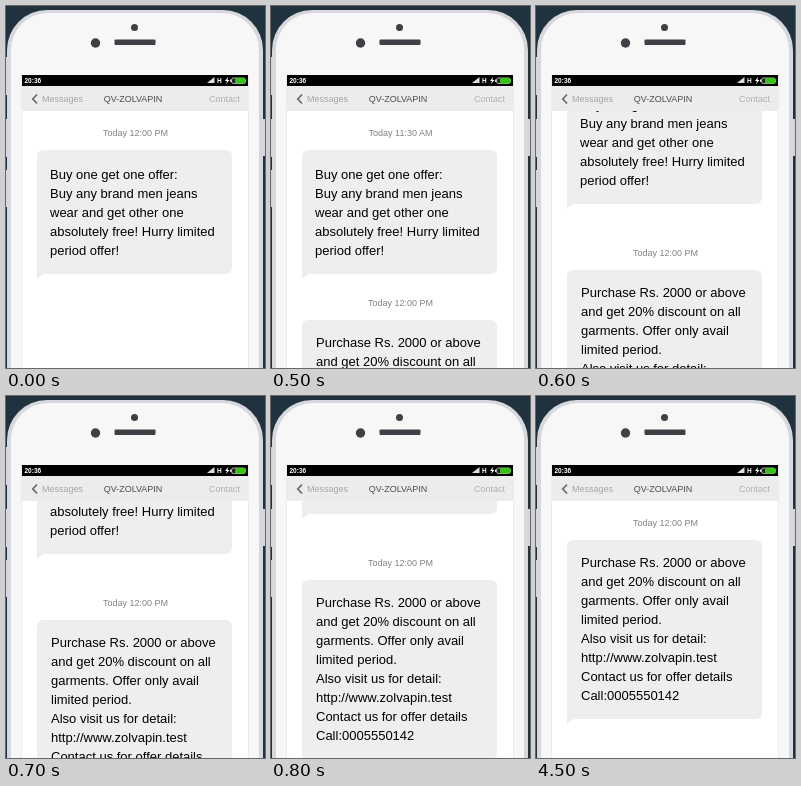
Animation of 259 by 362 pixels, one loop 6900 ms. Source, as an HTML page:

```html
<!DOCTYPE html>
<html lang="en">
<head>
<meta charset="utf-8">
<title>Message thread</title>
<style>
  html, body { margin: 0; width: 100%; height: 100%; overflow: hidden; background: #20323d; }
  svg { display: block; width: 259px; height: 362px; }
  text { font-family: "Liberation Sans", Arial, sans-serif; white-space: pre; }
  .small { font-size: 9px; }
  .body { font-size: 13px; fill: #000; }
  .stamp { font-size: 9px; fill: #808080; text-anchor: middle; }
  .bubble { fill: #eee; }
</style>
</head>
<body>
<svg viewBox="0 0 259 362">
  <defs>
    <clipPath id="chat"><rect x="16" y="105" width="226" height="257"/></clipPath>
  </defs>

  <rect width="259" height="362" fill="#20323d"/>

  <!-- side buttons -->
  <g fill="#d3d5da">
    <rect x="0" y="51" width="3" height="38"/>
    <rect x="0" y="113" width="3" height="38"/>
    <rect x="0" y="164" width="3" height="37"/>
    <rect x="255" y="113" width="4" height="37"/>
  </g>

  <!-- case -->
  <rect x="1" y="4" width="256" height="420" rx="40" fill="#d6d8dd"/>
  <rect x="5" y="7" width="248" height="420" rx="37" fill="#f7f7f7"/>
  <g fill="#3f4046">
    <circle cx="128.500" cy="21.500" r="3.500"/>
    <circle cx="89.500" cy="37" r="4.700"/>
    <rect x="108.500" y="33.500" width="41" height="5.500" rx="1"/>
  </g>

  <!-- screen -->
  <rect x="15" y="69" width="228" height="293" fill="#ebebeb"/>
  <rect x="16" y="105" width="226" height="257" fill="#fff"/>
  <g id="thread" clip-path="url(#chat)"></g>

  <!-- status bar -->
  <rect x="16" y="69" width="226" height="11" fill="#000"/>
  <g fill="#fff" font-size="6.500" font-weight="bold">
    <text x="18.500" y="77">20:36</text>
    <path d="M201 77 L208.500 77 L208.500 71 Z" fill="#ddd"/>
    <text x="211" y="77">H</text>
    <path d="M222 71 L219 75 H221 L220 78 L223.500 74 H221.500 Z"/>
  </g>
  <rect x="225.500" y="72" width="14" height="5.500" rx="2" fill="#222" stroke="#cfd8cc" stroke-width=".8"/>
  <rect x="229" y="72" width="10.500" height="5.500" rx="1.500" fill="#35c414"/>
  <rect x="224" y="73.500" width="1.500" height="2.500" fill="#cfd8cc"/>

  <!-- title bar -->
  <rect x="15" y="80" width="228" height="25" fill="#ececec"/>
  <path d="M31 88.500 L26.800 93 L31 97.500" fill="none" stroke="#6c6c6c" stroke-width="1.800"/>
  <g class="small">
    <text x="36" y="96" fill="#a6a6a6">Messages</text>
    <text x="127" y="96" fill="#4c4c4c" text-anchor="middle">QV-ZOLVAPIN</text>
    <text x="203" y="96" fill="#b0b0b0">Contact</text>
  </g>
</svg>

<script>
const NS = "http://www.w3.org/2000/svg";
const thread = document.getElementById("thread");

function add(parent, tag, attrs, text) {
  const el = document.createElementNS(NS, tag);
  for (const key in attrs) el.setAttribute(key, attrs[key]);
  if (text) el.textContent = text;
  return parent.appendChild(el);
}

// Each message is drawn with its bubble top at y = 0.
function message(lines, height, x, baseline) {
  const g = add(thread, "g", {});
  const stamp = add(g, "text", { class: "stamp", x: 129.5, y: -14 }, "Today 12:00 PM");
  add(g, "rect", { class: "bubble", x: 31, y: 0, width: 195, height, rx: 6 });
  add(g, "path", { class: "bubble", d: `M31 ${height - 9} V${height + 4.5} L38 ${height} V${height - 9} Z` });
  lines.forEach((line, i) =>
    add(g, "text", { class: "body", x, y: baseline + i * 19 }, line));
  return { g, stamp };
}

const first = message([
  "Buy one get one offer:",
  "Buy any brand men jeans",
  "wear and get other one",
  "absolutely free! Hurry limited",
  "period offer!"
], 124, 44, 29);

const second = message([
  "Purchase Rs. 2000 or above",
  "and get 20% discount on all",
  "garments. Offer only avail",
  "limited period.",
  "Also visit us for detail:",
  "http://www.zolvapin.test",
  "Contact us for offer details",
  "Call:0005550142"
], 179, 45, 27);

// [start ms, first bubble top, second bubble top]
const LOOP = 6900;
const STEPS = [
  [0, 144, 400],
  [500, 144, 314],
  [600, 74, 264],
  [700, 34, 224],
  [800, -6, 184],
  [900, -46, 144]
];

let shown = null;

function draw(time) {
  const step = STEPS.findLast(s => s[0] <= time % LOOP);
  if (step === shown) return;
  shown = step;
  const [from, top1, top2] = step;
  first.g.setAttribute("transform", `translate(0 ${top1})`);
  second.g.setAttribute("transform", `translate(0 ${top2})`);
  first.stamp.textContent = from ? "Today 11:30 AM" : "Today 12:00 PM";
}

const start = performance.now();
function tick() {
  draw(performance.now() - start);
  requestAnimationFrame(tick);
}
tick();
</script>
</body>
</html>
```
